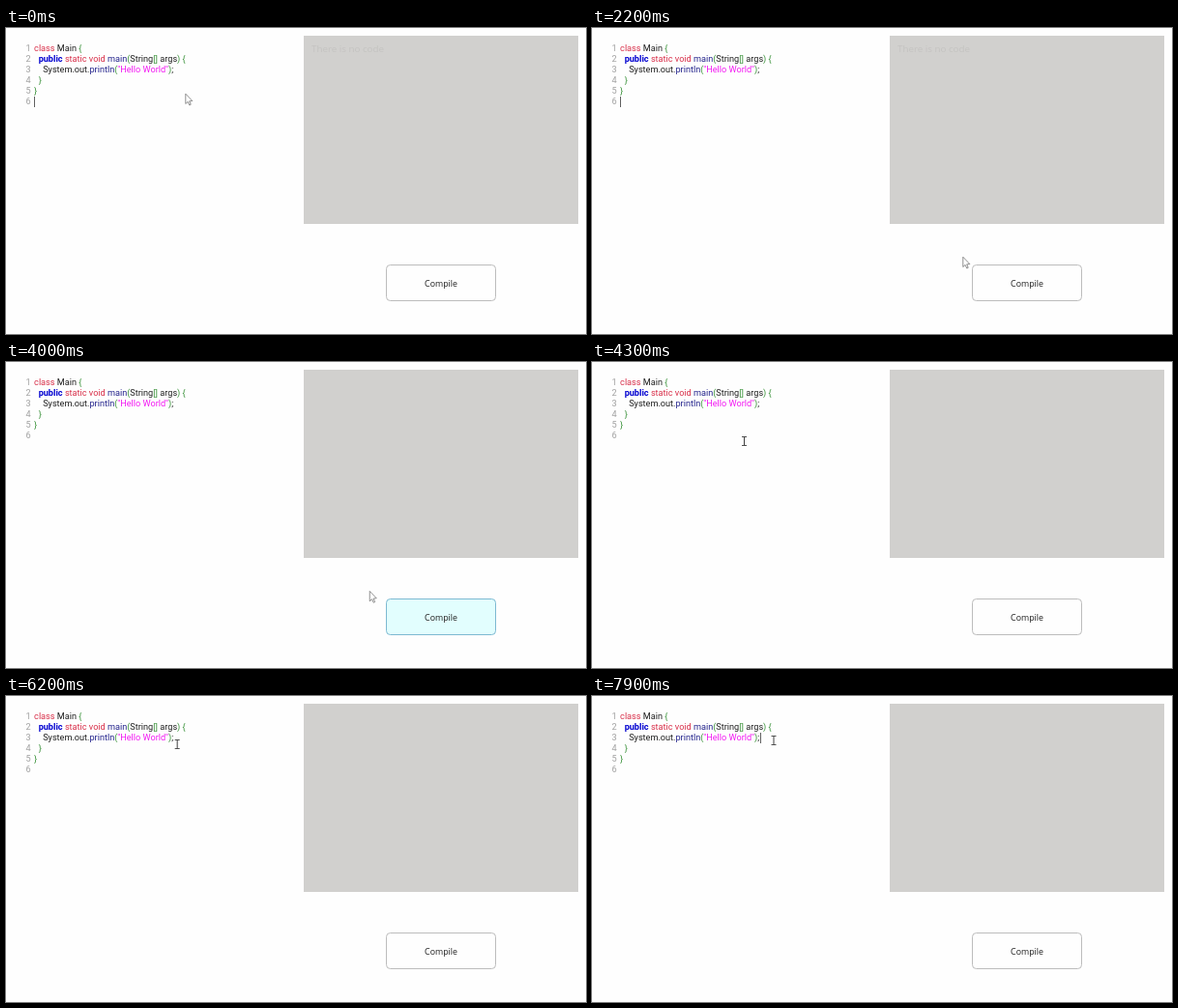
Write an HTML page with a canvas that moves like this. It is 600 by 317 pixels and loops after 8 s.

```html
<!DOCTYPE html>
<html lang="en">
<head>
<meta charset="utf-8">
<title>Code editor</title>
<style>
html, body { margin: 0; width: 100%; height: 100%; overflow: hidden; background: #fefefe; }
canvas { display: block; width: 600px; height: 317px; }
</style>
</head>
<body>
<canvas id="stage"></canvas>
<script>
const W = 600, H = 317, LOOP = 8000, STEP = 100;
const canvas = document.getElementById('stage');
const ctx = canvas.getContext('2d');
const ratio = window.devicePixelRatio || 1;
canvas.width = W * ratio;
canvas.height = H * ratio;

const CODE = '9.15px Roboto, sans-serif';
const BOLD = 'bold ' + CODE;
const UI = '"Open Sans", sans-serif';
const INK = '#202020', RED = '#d8304a', BLUE = '#0000d0', NAVY = '#24248c',
      GREEN = '#3a923a', PINK = '#f218f2';

const LINES = [
  [['class', RED], [' Main ', INK], ['{', GREEN]],
  [['  ', INK], ['public', BLUE, BOLD], [' static void', RED], [' main', NAVY], ['(', GREEN],
   ['String', INK], ['[]', GREEN], [' args', INK], [') {', GREEN]],
  [['    System.out.', INK], ['println', NAVY], ['(', GREEN], ['"Hello World"', PINK],
   [')', GREEN], [';', INK]],
  [['  }', GREEN]],
  [['}', GREEN]],
  []
];

// Each pointer move eases to a stop: from and to in time, then where it ends
const HOME = { x: 186, y: 68 };
const MOVES = [
  { from: 400, to: 600, x: 349, y: 240 },
  { from: 1100, to: 1300, x: 316, y: 228 },
  { from: 1300, to: 2200, x: 384, y: 237 },
  { from: 2200, to: 2800, x: 417, y: 266 },
  { from: 3900, to: 4300, x: 157.5, y: 82 },
  { from: 4300, to: 5200, x: 73, y: 50 },
  { from: 5200, to: 6400, x: 185.5, y: 50 },
  { from: 7200, to: 7700, x: 188, y: 46 }
];
const BLINK = 530, FOCUS_LOST = 2700, CLEARED = 3000, IN_EDITOR = 4300, CLICK = 7600;

const clamp = v => Math.max(0, Math.min(1, v));
const ease = k => k * k * (3 - 2 * k);

function pointerAt(t) {
  let { x, y } = HOME;
  for (const m of MOVES) {
    const k = ease(clamp((t - m.from) / (m.to - m.from)));
    x += (m.x - x) * k;
    y += (m.y - y) * k;
  }
  return { x, y };
}

function text(str, x, y, color, font, align = 'left') {
  ctx.font = font;
  ctx.fillStyle = color;
  ctx.textAlign = align;
  ctx.fillText(str, x, y);
}

function drawCode() {
  LINES.forEach((line, i) => {
    const y = 24 + i * 11;
    let x = 29.1;
    text(i + 1, 20.5, y, '#a0a0a0', CODE);
    for (const [str, color, font = CODE] of line) {
      text(str, x, y, color, font);
      x += ctx.measureText(str).width;
    }
  });
}

function drawCaret(t) {
  ctx.fillStyle = '#606060';
  const lit = t < 600 || Math.floor((t - 70) / BLINK) % 2 === 0;
  if (t < FOCUS_LOST && lit) ctx.fillRect(29, 71, 1, 11);
  if (t >= CLICK) ctx.fillRect(174, 38, 1, 11);
}

function drawPanel(t) {
  ctx.fillStyle = '#d1d0ce';
  ctx.fillRect(308, 8, 284, 195);
  if (t < CLEARED) text('There is no code', 316, 24.5, '#c4c3c1', '9.8px ' + UI);
}

function drawButton(t) {
  const hover = clamp((t - 2300) / 200) * clamp((4200 - t) / 200);
  const mix = (a, b) => Math.round(a + (b - a) * hover);
  ctx.beginPath();
  ctx.roundRect(393.5, 245.5, 113, 37, 4);
  ctx.fillStyle = `rgb(${mix(254, 226)},254,254)`;
  ctx.fill();
  ctx.strokeStyle = `rgb(${mix(188, 125)},${mix(188, 185)},${mix(188, 210)})`;
  ctx.lineWidth = 1;
  ctx.stroke();
  text('Compile', 450, 268, '#1c1c1c', '8.8px ' + UI, 'center');
}

function drawArrow({ x, y }) {
  const shape = [[0, 0], [0, 10.3], [2.3, 8.2], [4, 11.8], [5.4, 11.1], [3.9, 7.6], [7, 7.3]];
  ctx.beginPath();
  for (const [dx, dy] of shape) ctx.lineTo(x - 0.2 + dx, y + 0.2 + dy);
  ctx.closePath();
  ctx.fillStyle = '#fff';
  ctx.fill();
  ctx.strokeStyle = '#606060';
  ctx.lineWidth = 0.7;
  ctx.stroke();
}

function drawBeam({ x, y }) {
  ctx.fillStyle = '#404040';
  ctx.fillRect(x - 0.5, y - 4.5, 1, 9);
  for (const dy of [-5, 4]) ctx.fillRect(x - 2.5, y + dy, 5, 0.9);
}

function draw(t) {
  ctx.setTransform(ratio, 0, 0, ratio, 0, 0);
  ctx.fillStyle = '#fefefe';
  ctx.fillRect(0, 0, W, H);
  drawCode();
  drawPanel(t);
  drawButton(t);
  drawCaret(t);
  const drawPointer = t < IN_EDITOR ? drawArrow : drawBeam;
  drawPointer(pointerAt(t));
}

const start = performance.now();
function tick() {
  const t = (performance.now() - start) % LOOP;
  draw(Math.floor(t / STEP) * STEP);
  requestAnimationFrame(tick);
}
tick();
</script>
</body>
</html>
```
